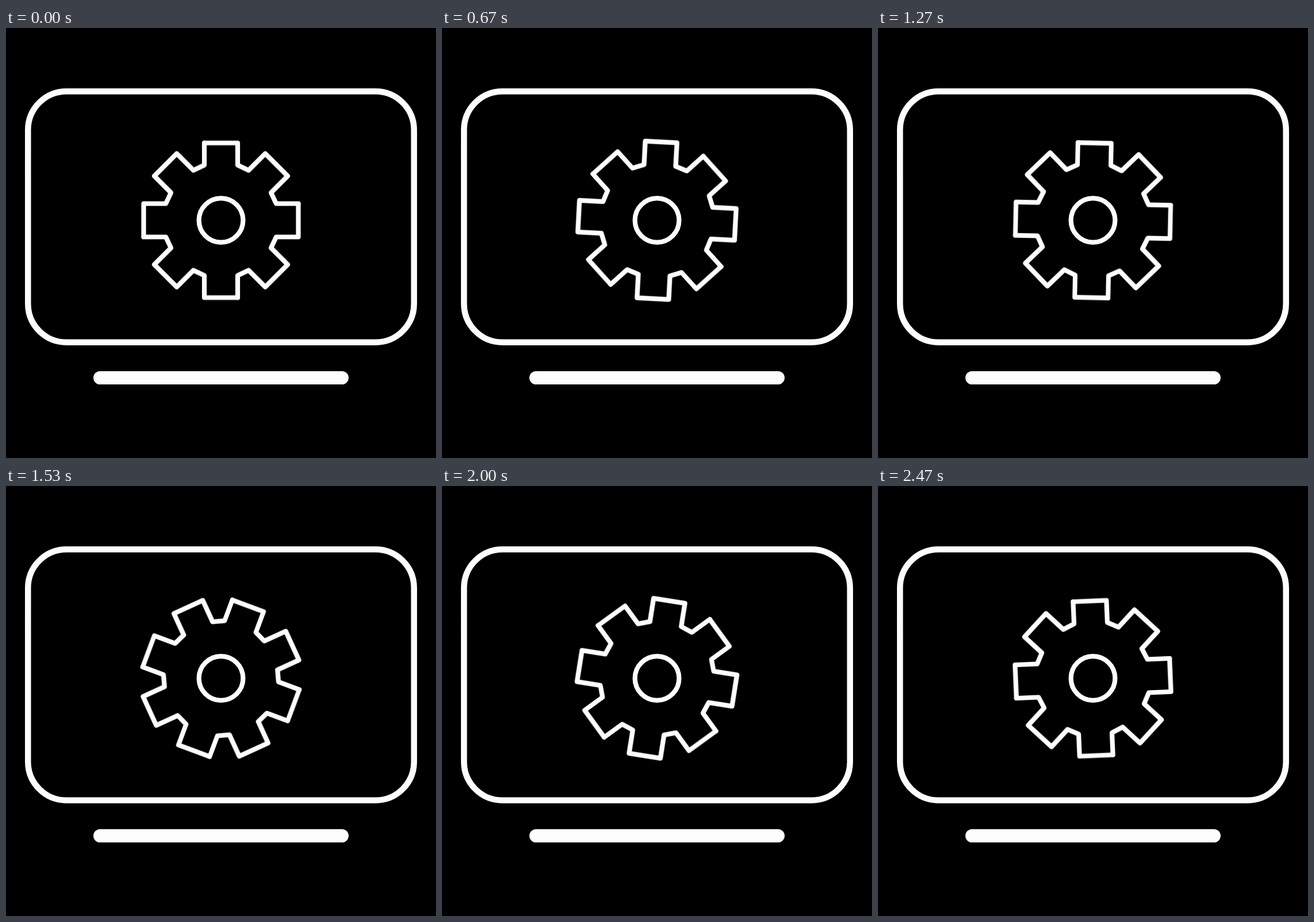
Animation of 748 by 748 pixels, one loop 2.5 s. Source, as an HTML page without scripts:

```html
<!DOCTYPE html>
<html lang="en">
<head>
<meta charset="utf-8">
<title>Monitor with turning gear</title>
<style>
  html, body {
    margin: 0;
    width: 100%;
    height: 100%;
    overflow: hidden;
    background: #000;
  }
  svg { display: block; width: 100%; height: 100%; }
  .line {
    fill: none;
    stroke: #fdfdfd;
    stroke-linecap: round;
    stroke-linejoin: round;
  }
  .stand { fill: #fdfdfd; }
  /* The small lead keeps steps on 10 ms frame boundaries. */
  .gear { animation: turn 2500ms steps(75) -4ms infinite; }
  @keyframes turn {
    from { transform: rotate(0deg); }
    to { transform: rotate(180deg); }
  }
</style>
</head>
<body>
<svg viewBox="0 0 748 748">
  <defs>
    <path id="quarter" d="M-29-134.5H29V-96L48-87L77-116L116-77L87-48L96-29H134.5"/>
  </defs>
  <rect class="line" x="38.25" y="110.25" width="671.5" height="436.5" rx="67" stroke-width="10.5"/>
  <rect class="stand" x="152" y="597" width="444" height="23" rx="11.5"/>
  <g class="line" transform="translate(374 334.5)" stroke-width="8.2">
    <circle r="38.4"/>
    <g class="gear">
      <use href="#quarter"/>
      <use href="#quarter" transform="rotate(90)"/>
      <use href="#quarter" transform="rotate(180)"/>
      <use href="#quarter" transform="rotate(270)"/>
    </g>
  </g>
</svg>
</body>
</html>
```
